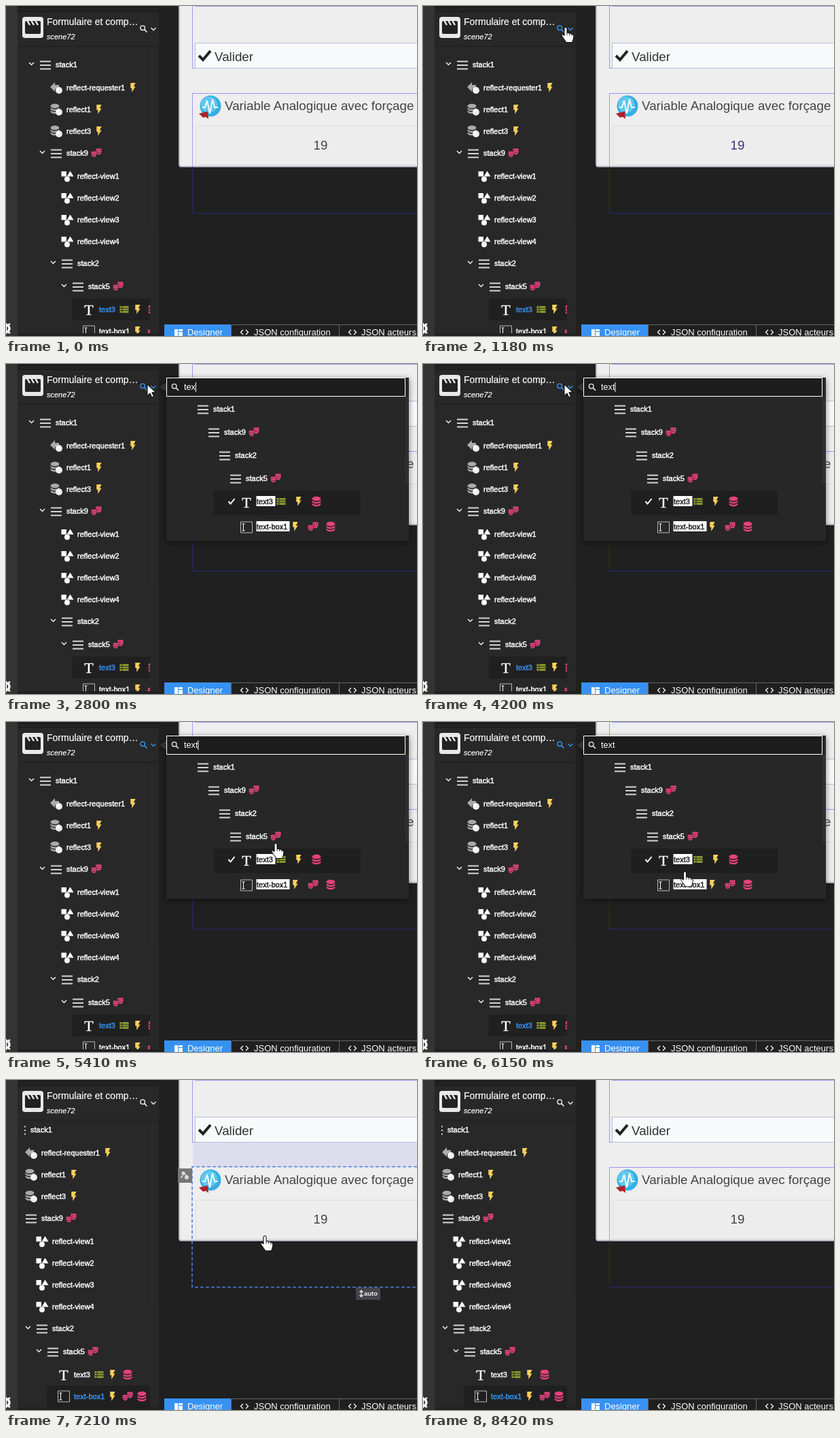
Animation of 605x485 px, one loop 8880 ms. Source, as an HTML page:

```html
<!DOCTYPE html>
<html lang="fr">
<head>
<meta charset="utf-8">
<style>
html, body { margin: 0; width: 100%; height: 100%; overflow: hidden; background: #202020; }
svg { display: block; width: 605px; height: 485px; font-family: "Liberation Sans", Arial, sans-serif; }
text { white-space: pre; }
.row { font-size: 11px; stroke-width: .45px; }
</style>
</head>
<body>
<svg id="stage" viewBox="0 0 605 485"></svg>
<script>
const LOOP = 8880;
const BLUE = '#3791f2', PINK = '#e6427c', YELLOW = '#fdd05c', GREEN = '#8a9a2e';

const rect = (x, y, w, h, fill, extra = '') =>
  `<rect x="${x}" y="${y}" width="${w}" height="${h}" fill="${fill}" ${extra}/>`;
const text = (x, y, size, fill, str, extra = '') =>
  `<text x="${x}" y="${y}" font-size="${size}" fill="${fill}" ${extra}>${str}</text>`;
const path = (d, fill, extra = '') => `<path d="${d}" fill="${fill}" ${extra}/>`;
const line = (d, stroke, width = 1, extra = '') =>
  path(d, 'none', `stroke="${stroke}" stroke-width="${width}" ${extra}`);
const circle = (x, y, r, fill, extra = '') => `<circle cx="${x}" cy="${y}" r="${r}" fill="${fill}" ${extra}/>`;
const group = (id, body, extra = '') => `<g id="${id}" ${extra}>${body}</g>`;
const at = (x, y, body, scale = 1) => `<g transform="translate(${x} ${y}) scale(${scale})">${body}</g>`;
const label = (x, y, str, fill = '#fff') =>
  `<text class="row" x="${x}" y="${y + 4}" fill="${fill}" stroke="${fill}">${str}</text>`;

// Icons are drawn around their own centre.
const cylinder = 'M0-9C-4.4-9-8-7.2-8-5s3.6 4 8 4 8-1.8 8-4-3.6-4-8-4M-8-3v3c0 2.2 3.6 4 8 4s8-1.8 8-4v-3c0 2.2-3.6 4-8 4s-8-1.8-8-4m0 5v3c0 2.2 3.6 4 8 4s8-1.8 8-4V2c0 2.2-3.6 4-8 4s-8-1.8-8-4z';
const ball = circle(4, 4, 5, '#eee') + circle(2.8, 2.6, 2, '#fff');
const mask = (x, y) =>
  path(`M${x} ${y}h8v4.500q-.5 4-4 4.500q-3.500-.5-4-4.500z`, PINK) +
  line(`M${x + 1.500} ${y + 2.800}h1.700m1.600 0h1.700M${x + 2} ${y + 5.500}q2 1.500 4 0`, '#282828', .9);
const icons = {
  stack: rect(-8, -6.500, 16, 2, '#d4d4d4') + rect(-8, -1, 16, 2, '#d4d4d4') + rect(-8, 4.500, 16, 2, '#d4d4d4'),
  bolt: path('M-3.700-7v7.700h2v6L3.600-1.500H.8L3.600-7z', YELLOW),
  masks: mask(-.5, -6.500) + `<g stroke="#282828" stroke-width=".6">${mask(-7.500, -2.500)}</g>`,
  db: path(cylinder, PINK, 'transform="scale(.8)"'),
  list: rect(-6.500, -5, 13, 10, GREEN) + line('M-6.500-1.700h13m-13 3.300h13M-3-5v10', '#282828', .9),
  source: path(cylinder, '#aaa', 'transform="translate(-2 -1) scale(.8)"') + ball,
  request: path('M-9-1l7-7v4h6v6h-6v4z', '#aaa') + ball,
  view: rect(-8.500, -7, 7.500, 7.500, '#fff') + path('M4.500-7.500l5 8h-10z', '#fff') + circle(0, 4.500, 4, '#fff'),
  type: text(0, 7.500, 22, '#fff', 'T', 'text-anchor="middle" font-family="Liberation Serif, serif" stroke="#fff" stroke-width=".4"'),
  box: line('M-8.500-8h17v16h-17z', '#bbb') + line('M-6.500-5h4m-2 0v10m-2 0h4', '#fff'),
  chevron: line('M-3.500-2L0 1.500 3.500-2', '#eee', 1.500),
  check: line('M-4.500 0L-1.500 3.500 4.500-4', '#fff', 2),
  search: circle(-1.300, -1.300, 3.300, 'none', 'stroke="currentColor" stroke-width="1.400"') +
    line('M1.200 1.200L5 5', 'currentColor', 1.700)
};
const icon = (name, x, y) => at(x, y, icons[name]);

const nodes = {
  stack1: ['stack', 0], 'reflect-requester1': ['request', 1, 'bolt'],
  reflect1: ['source', 1, 'bolt'], reflect3: ['source', 1, 'bolt'],
  stack9: ['stack', 1, 'masks'], 'reflect-view1': ['view', 2], 'reflect-view2': ['view', 2],
  'reflect-view3': ['view', 2], 'reflect-view4': ['view', 2], stack2: ['stack', 2],
  stack5: ['stack', 3, 'masks'], text3: ['type', 4, 'list', 'bolt', 'db'],
  'text-box1': ['box', 4, 'bolt', 'masks', 'db']
};
const treeY = [86, 120, 152, 184, 216, 250, 282, 314, 346, 378, 412, 446, 478];
const badgeX = {
  'reflect-requester1': [187], reflect1: [137], reflect3: [137], stack9: [133], stack5: [165],
  text3: [174, 194, 216], 'text-box1': [194, 216, 237]
};

const tree = selected => Object.entries(nodes).map(([name, [kind, depth, ...badges]], i) => {
  const x = 58 + depth * 16, y = treeY[i], active = name === selected;
  return (active ? rect(97, y - 16, 200, 32, '#202020') : '') +
    (kind === 'stack' ? icon('chevron', x - 20.500, y - 1) : '') +
    icon(kind, x, y + (kind === 'stack' ? 1 : 0)) +
    label(x + 15, y, name, active ? BLUE : '#fff') +
    badges.map((b, k) => icon(b, badgeX[name][k], y)).join('');
}).join('');

const resultY = [66, 100, 134, 168, 202, 239];
const results = (names, query) => names.map((name, i) => {
  const [kind, depth, ...badges] = nodes[name];
  const x = 290 + depth * 16, y = resultY[i], hit = name.includes(query);
  const width = name === 'text-box1' ? 49 : name === 'text3' ? 28 : name.length * 5.200;
  const firstBadge = { stack: x + 59, type: 405, box: 426 }[kind] || x + width + 28;
  return (kind === 'type' ? rect(306, y - 16, 216, 36, '#1f1f1f') + icon('check', 332, y) : '') +
    (kind === 'box' ? group('hover', rect(320, 223, 188, 32, BLUE)) : '') +
    icon(kind, x, y + 1) + (hit ? rect(x + 14.500, y - 8, width, 15, '#fff') : '') +
    label(x + 15, y, name, hit ? '#222' : '#fff') +
    badges.map((b, k) => icon(b, firstBadge + 26 * k, y)).join('');
}).join('');

const outline = 'rgba(70,70,245,.5)';
const designer =
  path('M255 -5H610V236H258q-3 0-3-3z', '#eee', 'stroke="#b4b4c4" stroke-width="2"') +
  line('M274.500 0V91.500H605M278 .5H605', outline) +
  rect(278.500, 54.500, 330, 37, '#f8f9fb', 'stroke="#b9bddf"') +
  line('M284 73l6 6 11-13', '#222', 4) +
  text(307, 80.500, 18.800, '#333', 'Valider') +
  group('spacing', rect(275, 92, 330, 36, '#dddded')) +
  circle(301, 147, 15.500, '#35aee2') + circle(299, 145, 12, '#62c7ef') +
  line('M289 149h4l3-10 4 19 4-21 3 12h5', '#fff', 1.800) +
  path('M284 158l13-3 1 11-4-3-4 1z', '#ad2127') +
  text(322, 153, 18.800, '#444', 'Variable Analogique avec forçage') +
  rect(279.500, 176.500, 330, 57, '#ededed', 'stroke="#ddd"') +
  text(463, 211, 18.800, '#444', '19', 'id="value" text-anchor="middle"') +
  group('frame', line('M605 128.500H274.500V236', outline) + line('M274.500 236V304.500H605', 'rgba(50,50,200,.5)')) +
  group('focus',
    line('M605 127.500H274V304.500H605', '#4b7fe0', 1.600, 'stroke-dasharray="5 3"') +
    rect(253, 130, 21, 21, '#777') + circle(261, 137, 2.500, '#ddd') + line('M257 144l4-4M263 138l4 4', '#ddd', 1.500) +
    circle(266, 143, 3, '#ddd') +
    rect(515, 305, 36, 18, '#45454b') + line('M523 310v8M520.500 312l2.500-2.500 2.500 2.500M520.500 316l2.500 2.500 2.500-2.500', '#eee', 1.300) +
    text(527, 317, 9.500, '#eee', 'auto', 'font-weight="bold"'));

const tabs = rect(233, 468, 98, 17, BLUE) + rect(248, 475, 5, 10, '#fff') + rect(254, 475, 6, 3, '#fff') +
  rect(254, 479, 6, 6, '#fff') + text(267, 484, 13, '#fff', 'Designer') +
  line('M331.500 485V468.500H605M490.500 468v17', '#666') +
  [345, 504].map(x => line(`M${x + 4} 476l-3.500 3.500 3.500 3.500M${x + 8} 476l3.500 3.500-3.500 3.500`, '#fff', 1.300)).join('') +
  text(365, 484, 13, '#fff', 'JSON configuration') + text(523, 484, 13, '#fff', 'JSON acteurs');

const panel = rect(0, 0, 17, 485, '#343434') + rect(17, 0, 208, 481, '#282828') +
  rect(17, 0, 208, 3, '#1d1d1d') + rect(17, 3, 208, 4, '#242424') + rect(17, 7, 208, 2, '#1e1e1e') +
  rect(17, 58, 208, 2, '#222') + rect(213, 65, 5, 260, '#2a2a2a') +
  circle(0, 474, 5, 'none', 'stroke="#fff" stroke-width="3.500" ') + line('M0 466v16M3 469l3-2M3 479l3 2', '#fff', 2.500) +
  rect(24, 16, 31, 31, '#e8e8e8', 'rx="4"') + rect(28, 22, 23, 19, '#222', 'rx="2"') +
  line('M31 21l4 7M37 21l4 7M43 21l4 7', '#e8e8e8', 2.500) +
  text(60, 28, 14, '#fff', 'Formulaire et comp…', 'stroke="#fff" stroke-width=".2"') +
  text(60, 49, 11, '#fff', 'scene72', 'font-style="italic" stroke="#fff" stroke-width=".2"') +
  group('tools', icon('search', 202.500, 33.500) + at(217, 34, line('M-3.500-2L0 1.500 3.500-2', 'currentColor', 1.400)));

const queries = {
  t: ['stack1', 'reflect-requester1', 'reflect1', 'reflect3', 'stack9', 'reflect-view1'],
  te: ['stack1', 'reflect-requester1', 'stack9', 'stack2', 'stack5', 'text3'],
  tex: ['stack1', 'stack9', 'stack2', 'stack5', 'text3', 'text-box1']
};
const popup =
  path('M226 34l10-7v14z', '#333') +
  group('results', rect(236, 20, 357, 240, '#272727') + rect(588, 48, 5, 129, '#303030') +
    Object.entries(queries).map(([q, names]) => group('q-' + q, results(names, q))).join('')) +
  rect(236.500, 20.500, 171, 27, '#1d1d1d', 'id="input"') +
  `<g color="#e4e4e4">${icon('search', 249, 34)}</g>` +
  text(262, 38, 12.670, '#fff', '', 'id="typed"') + group('caret', rect(0, 27, 1, 14, '#fff'));

const hand = path('M-2 1.500q2-2.500 4 0V8l6 1.500q4 1 4 4l-1 5-1.500 4H1L-5 14q-2-2.500 0-3.500l3 2z', '#fff', 'stroke="#000" stroke-linejoin="round"') +
  line('M2 8v4M5.500 9v3M9 10v3', '#000', .8);
const arrow = path('M0 0v16.500l4-3.700 2.700 6 2.800-1.200-2.700-5.800h5.500z', '#fff', 'stroke="#000"');

const stage = document.getElementById('stage');
stage.innerHTML =
  '<clipPath id="clip"><rect x="27" y="61" width="185" height="420"/></clipPath>' +
  rect(0, 0, 605, 485, '#202020') + designer + tabs + panel +
  `<g clip-path="url(#clip)">${group('before', tree('text3'))}${group('after', tree('text-box1'), 'transform="translate(-37 -13)"')}</g>` +
  group('popup', popup, 'style="filter:drop-shadow(0 2px 4px rgba(0,0,0,.5))"') +
  group('cursor', group('hand', hand) + group('arrow', arrow));

const $ = id => document.getElementById(id);
const show = (id, on) => { $(id).style.display = on ? '' : 'none'; };
const ramp = (t, a, b) => Math.min(1, Math.max(0, (t - a) / (b - a)));

const moves = [
  [330, 455, 300], [460, 222, 20], [720, 222, 20], [980, 210, 31], [2200, 210, 31], [2270, 208, 30],
  [4730, 208, 30], [5130, 300, 96], [5410, 397, 178], [5610, 402, 188], [5670, 402, 188],
  [6280, 381, 228], [8000, 381, 229], [8280, 560, 340], [8420, 610, 365]
];
function pointer(t) {
  const i = Math.max(1, moves.findIndex(m => m[0] > t));
  const [a, x, y] = moves[i - 1], [b, u, v] = moves[i], k = ramp(t, a, b);
  return [x + (u - x) * k, y + (v - y) * k];
}

const keys = [[1670, ''], [2270, 't'], [2530, 'te'], [2800, 'tex'], [3130, 'text']];

function draw(t) {
  const done = t >= 6940, focused = t >= 1670 && t < 6480;
  const [keyTime, typed] = keys.filter(k => k[0] <= t).pop() || [0, ''];

  show('before', !done);
  show('after', done);
  $('tools').style.color = t >= 860 && t < 7140 ? BLUE : '#eee';
  $('value').setAttribute('fill', t >= 460 && !done ? '#34347c' : '#444');

  const opacity = ramp(t, 1200, 1530) * (1 - ramp(t, 6940, 7200));
  show('popup', opacity > 0);
  $('popup').style.opacity = opacity;
  show('results', typed);
  for (const q in queries) show('q-' + q, q === typed.slice(0, 3));
  show('hover', t >= 6200);
  $('input').setAttribute('width', typed ? 351 : 171);
  $('input').setAttribute('stroke', focused ? (typed ? '#fff' : '#bbb') : '#484848');
  $('typed').textContent = typed || 'Rechercher un acteur...';
  $('typed').setAttribute('fill', typed ? '#fff' : '#686868');
  show('caret', focused && Math.floor((t - keyTime) / 530) % 2 === 0);
  const caretX = typed ? 262 + $('typed').getComputedTextLength() : 262;
  $('caret').setAttribute('transform', `translate(${caretX} 0)`);

  const selected = t >= 7140 && t < 8220;
  show('focus', selected);
  show('spacing', selected);
  show('frame', !selected);

  const visible = t >= 330 && t < 8420;
  show('cursor', visible);
  if (visible) {
    const pointing = (t >= 860 && t < 2270) || (t >= 5300 && t < 6280) || (t >= 6940 && t < 8200);
    $('cursor').setAttribute('transform', `translate(${pointer(t)})`);
    show('hand', pointing);
    show('arrow', !pointing);
  }
}

const start = performance.now();
function tick() {
  draw((performance.now() - start) % LOOP);
  requestAnimationFrame(tick);
}
tick();
</script>
</body>
</html>
```
